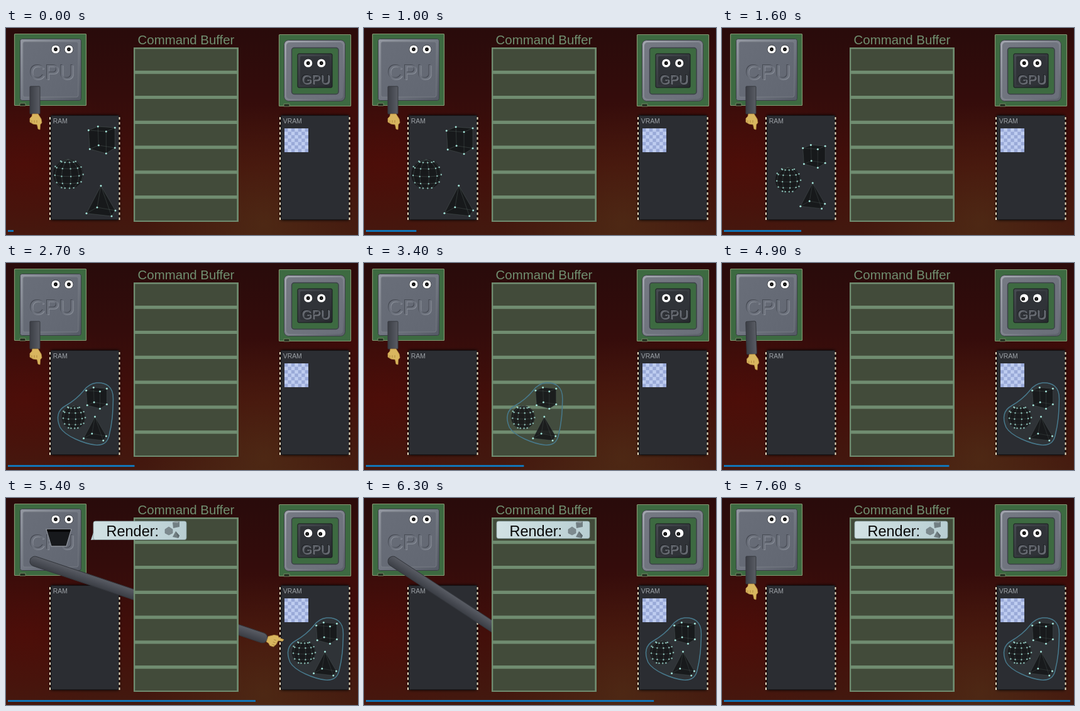
An HTML page with a canvas that plays this animation: 560 by 330 pixels, repeating every 7700 ms.

```html
<!DOCTYPE html>
<html lang="en">
<head>
<meta charset="utf-8">
<title>Command buffer</title>
<style>
html, body { margin: 0; width: 560px; height: 330px; overflow: hidden; background: #2c0c0c; }
canvas { display: block; }
</style>
</head>
<body>
<canvas id="stage" width="560" height="330"></canvas>
<script>
const ctx = document.getElementById('stage').getContext('2d');
const LOOP = 7700, STEP = 100;
const FONT = '"Liberation Sans", Arial, sans-serif';

const mix = (a, b, u) => a + (b - a) * u;
const span = (t, a, b) => Math.min(1, Math.max(0, (t - a) / (b - a)));
const ease = (t, a, b) => 0.5 - 0.5 * Math.cos(Math.PI * span(t, a, b));

function paint(fill, stroke, lw) {
  if (fill) { ctx.fillStyle = fill; ctx.fill(); }
  if (stroke) { ctx.strokeStyle = stroke; ctx.lineWidth = lw; ctx.stroke(); }
}

function box(x, y, w, h, r, fill, stroke, lw = 1) {
  ctx.beginPath();
  ctx.roundRect(x, y, w, h, r);
  paint(fill, stroke, lw);
}

function poly(points, fill, stroke, lw = 1) {
  ctx.beginPath();
  points.forEach(p => ctx.lineTo(p[0], p[1]));
  ctx.closePath();
  paint(fill, stroke, lw);
}

function disc(x, y, r, fill) {
  ctx.beginPath();
  ctx.arc(x, y, r, 0, 7);
  paint(fill);
}

function text(str, x, y, size, fill, align = 'left') {
  ctx.font = `${size}px ${FONT}`;
  ctx.textAlign = align;
  ctx.fillStyle = fill;
  ctx.fillText(str, x, y);
}

function gradient(x0, y0, x1, y1, ...colors) {
  const g = ctx.createLinearGradient(x0, y0, x1, y1);
  colors.forEach((c, i) => g.addColorStop(i / (colors.length - 1), c));
  return g;
}

function glow(x, y, r, rgb, a) {
  const g = ctx.createRadialGradient(x, y, 0, x, y, r);
  g.addColorStop(0, `rgba(${rgb},${a})`);
  g.addColorStop(1, `rgba(${rgb},0)`);
  ctx.fillStyle = g;
  ctx.fillRect(0, 0, 560, 330);
}

function background() {
  ctx.fillStyle = gradient(0, 0, 0, 330, '#290b0b', '#340c0b', '#430f0a', '#43190f');
  ctx.fillRect(0, 0, 560, 330);
  glow(30, 215, 150, '95,12,6', 0.35);
  glow(410, 310, 190, '88,56,26', 0.5);
  glow(560, 110, 130, '80,10,6', 0.4);
}

function panel(x, label) {
  ctx.save();
  ctx.shadowColor = '#000';
  ctx.shadowBlur = 5;
  box(x + 1, 139, 109, 167, 2, '#2b2d32');
  ctx.restore();
  box(x + 1.5, 139.5, 108, 166, 2, null, '#141518');
  ctx.fillStyle = '#e6dcc0';
  for (let y = 142; y < 304; y += 8) {
    ctx.fillRect(x - 1, y, 2, 4);
    ctx.fillRect(x + 109.5, y, 2, 4);
  }
  text(label, x + 4.7, 152, 10.4, '#9ea3a8');
}

function checker(x, y, n, size) {
  const c = size / n;
  ctx.fillStyle = '#bfcdf0';
  ctx.fillRect(x, y, size, size);
  ctx.fillStyle = '#9aaad8';
  for (let i = 0; i < n; i++)
    for (let j = i % 2; j < n; j += 2) ctx.fillRect(x + i * c, y + j * c, c, c);
}

function board(x, y, notch) {
  box(x + 0.5, y + 0.5, 114, 114, 1, '#3d6a41', '#849670', 1.2);
  box(notch, y + 111, 9, 4, 0, '#1d2a1c', '#849670', 0.8);
}

function engraved(str, x, y, size, fill, dark, light) {
  text(str, x + 1, y + 1, size, light, 'center');
  text(str, x - 1, y - 1, size, dark, 'center');
  text(str, x, y, size, fill, 'center');
}

function eyes(x, y, dx, dy) {
  for (const ex of [x, x + 21]) {
    disc(ex, y, 7.2, '#202328');
    disc(ex, y, 6.6, '#fff');
    disc(ex + dx, y + dy, 2.9, '#080808');
    disc(ex + dx, y + dy, 0.8, '#777');
  }
}

function cpu(t) {
  board(13, 9, 22);
  box(22.5, 17.5, 97, 98, 3, gradient(22, 17, 120, 116, '#9498a2', '#737883', '#555a65'), '#3a3e45');
  box(27, 22, 88, 88, 3, gradient(27, 22, 115, 110, '#696e79', '#626772'), '#7b808a', 0.8);
  engraved('CPU', 73.5, 82, 34, '#6c717c', '#474b54', '#878c96');
  const open = ease(t, 4950, 5150) * (1 - ease(t, 5700, 5900));
  if (open > 0) {
    const h = 27 * open;
    poly([[64, 50], [104, 50], [96, 50 + h], [72, 50 + h]], '#17191c', '#8d929b', 1.3);
    poly([[65, 50], [103, 50], [101.5, 50 + h * 0.15], [66.5, 50 + h * 0.15]], '#050505');
  }
  eyes(79, 34, 0, 0);
}

function gpu(t) {
  board(434, 10, 442);
  box(442.5, 19.5, 97, 97, 7, gradient(442, 19, 540, 116, '#a3a6af', '#80848e', '#5c606a'), '#3b3f45');
  box(446, 23, 90, 90, 5, gradient(446, 23, 536, 113, '#757983', '#6b6f7a'));
  box(454.5, 31.5, 74.5, 74, 4, '#3d6a41', '#3c4048', 1.5);
  box(464, 41, 55, 54, 2, gradient(464, 41, 519, 95, '#484c52', '#25282c'), '#17191c');
  box(468, 45, 47, 46, 2, '#303338');
  engraved('GPU', 493, 88.5, 21, '#5b5f66', '#1e2024', '#74787f');
  const look = ease(t, 3450, 3800) * (1 - ease(t, 6600, 7000));
  eyes(480.7, 56, -1.5 * look, 1.2 * look);
}

const handPts = [[0, 4], [0, -5], [8, -10], [14, -11], [17, -8.5], [25, -8],
  [24, -5], [17, -3.5], [16, 3], [13, 8], [7, 8], [4, 5]];

function arm(t) {
  const reach = ease(t, 4850, 5350) * (1 - ease(t, 6000, 7000));
  const len = mix(36, 390, reach);
  ctx.save();
  ctx.translate(46, 101);
  ctx.rotate(mix(90, 18.6, reach) * Math.PI / 180);
  box(-8, -8, len + 8, 16, mix(1, 8, Math.min(1, reach * 8)), gradient(0, -8, 0, 8, '#5a5d65', '#4a4d55', '#3b3e45'), '#34373d');
  ctx.translate(len, 0);
  ctx.lineJoin = 'round';
  poly(handPts, '#d9b65f', '#b98f42', 0.8);
  ctx.strokeStyle = '#a67e35';
  ctx.beginPath();
  for (const y of [-3, 1, 5]) { ctx.moveTo(10, y); ctx.lineTo(14, y); }
  ctx.stroke();
  ctx.restore();
}

function buffer() {
  box(203, 31, 167, 278, 0, '#708c70');
  for (let i = 0; i < 7; i++) box(205.3, 33.5 + i * 39.8, 162, 34.6, 0, '#424b3a');
  text('Command Buffer', 286.5, 25.8, 20.4, '#708f70', 'center');
}

const cubePts = [[-7, -21], [20, -19], [6, -13], [-22, -15], [-6, 9], [20, 13], [6, 22], [-20, 15]];
const pyramidPts = [[0, -25.5], [-23, 18.5], [17, 23], [23, 14], [-6, 9]];
const cubeEdges = [0, 1, 2, 3].flatMap(i => [[i, (i + 1) % 4], [i + 4, (i + 1) % 4 + 4], [i, i + 4]]);
const pyramidEdges = [[0, 1], [0, 2], [0, 3], [1, 2], [2, 3], [0, 4], [4, 1], [4, 3]];

function wire(points, edges, hull, dot) {
  poly(hull.map(i => points[i]), 'rgba(20,22,24,0.85)');
  ctx.strokeStyle = 'rgba(125,145,140,0.3)';
  ctx.lineWidth = 0.8;
  ctx.beginPath();
  for (const [a, b] of edges) { ctx.moveTo(...points[a]); ctx.lineTo(...points[b]); }
  ctx.stroke();
  points.forEach(p => disc(p[0], p[1], dot, '#a5e6db'));
}

function globePoint(lat, lon) {
  const d = Math.PI / 180, tilt = 0.16;
  const x = Math.cos(lat * d) * Math.sin(lon * d);
  const z = Math.cos(lat * d) * Math.cos(lon * d), y = -Math.sin(lat * d);
  return [24 * x, 24 * (y * Math.cos(tilt) + z * Math.sin(tilt)), z * Math.cos(tilt) - y * Math.sin(tilt)];
}

function globe(dot) {
  disc(0, 0, 24, 'rgba(20,22,24,0.85)');
  ctx.strokeStyle = 'rgba(135,155,150,0.3)';
  ctx.lineWidth = 0.8;
  for (let lat = -60; lat <= 60; lat += 30) {
    for (let lon = 10; lon < 370; lon += 36) {
      const p = globePoint(lat, lon);
      if (p[2] < -0.05) continue;
      const a = globePoint(lat, lon + 36), b = globePoint(lat + 30, lon);
      ctx.beginPath();
      ctx.moveTo(a[0], a[1]);
      ctx.lineTo(p[0], p[1]);
      ctx.lineTo(b[0], b[1]);
      ctx.stroke();
      disc(p[0], p[1], dot, 'rgba(165,230,219,0.8)');
    }
  }
}

function outline(alpha) {
  ctx.save();
  ctx.globalAlpha = alpha;
  ctx.beginPath();
  ctx.moveTo(510, 191);
  ctx.bezierCurveTo(524, 190, 537, 196, 536.5, 217);
  ctx.bezierCurveTo(536, 240, 535, 255, 530, 275);
  ctx.bezierCurveTo(527, 288, 519, 291, 508, 290);
  ctx.bezierCurveTo(490, 288, 460, 276, 452, 262);
  ctx.bezierCurveTo(445, 246, 449, 234, 460, 228);
  ctx.bezierCurveTo(474, 220, 482, 213, 490, 203);
  ctx.bezierCurveTo(496, 195, 502, 192, 510, 191);
  paint('rgba(70,85,85,0.16)', '#487a8d', 1.5);
  ctx.restore();
}

function meshes(t) {
  const near = ease(t, 900, 2000);
  const shift = 366 * (ease(t, 2940, 4000) - 1);
  const scale = mix(1, 0.78, near);
  const place = (x0, y0, x1, y1, draw) => {
    ctx.save();
    ctx.translate(mix(x0, x1 - 366, near) + 366 + shift, mix(y0, y1, near));
    ctx.scale(scale, scale);
    draw();
    ctx.restore();
  };
  ctx.save();
  ctx.translate(shift, 0);
  outline(ease(t, 2100, 2600));
  ctx.restore();
  place(153.3, 178, 510.8, 215, () => wire(cubePts, cubeEdges, [3, 0, 1, 5, 6, 7], 1.5 / scale));
  place(99, 233, 473.6, 246, () => globe(1.2 / scale));
  place(151, 277, 507.5, 265, () => wire(pyramidPts, pyramidEdges, [0, 1, 2, 3], 1.5 / scale));
}

function icons() {
  poly([[114, 13], [120, 9], [126, 13], [126, 19], [120, 22], [114, 19]], '#7d8a8e', '#68757a', 0.6);
  poly([[126, 2], [137, 0], [137, 9], [127, 11]], '#717e82');
  poly([[126, 2], [130, 0], [137, 0], [134, 3]], '#94a1a4');
  poly([[131, 16], [126, 25], [135, 27], [137, 23]], '#707d81');
  poly([[131, 16], [135, 27], [137, 23]], '#5c686c');
}

function command(t) {
  if (t < 5000) return;
  const grow = ease(t, 4950, 5250), slide = ease(t, 5600, 6100);
  ctx.save();
  ctx.translate(mix(139, 211, slide), 66);
  ctx.scale(grow, grow);
  ctx.translate(0, -29);
  const tail = 1 - span(slide, 0, 0.4);
  if (tail > 0) poly([[0, 18], [-4 * tail, 30], [8, 29]], '#bcd2d6');
  box(0, 0, 148, mix(29.5, 27.5, slide), 3, gradient(0, 0, 148, 28, '#d2e2e4', '#b8ced2'), '#8ba2a5', 0.8);
  text('Render:', 20.5, 23.5, 23.5, '#080808');
  icons();
  ctx.restore();
}

function draw(now) {
  const t = Math.floor((now % LOOP) / STEP) * STEP;
  background();
  panel(70, 'RAM');
  panel(436, 'VRAM');
  checker(443, 160, 7, 38);
  cpu(t);
  gpu(t);
  arm(t);
  buffer();
  meshes(t);
  command(t);
  box(3, 322, 9 + 0.0713 * t, 3, 0, '#1176b8');
}

const start = performance.now();
function frame() {
  draw(performance.now() - start);
  requestAnimationFrame(frame);
}
frame();
</script>
</body>
</html>
```
